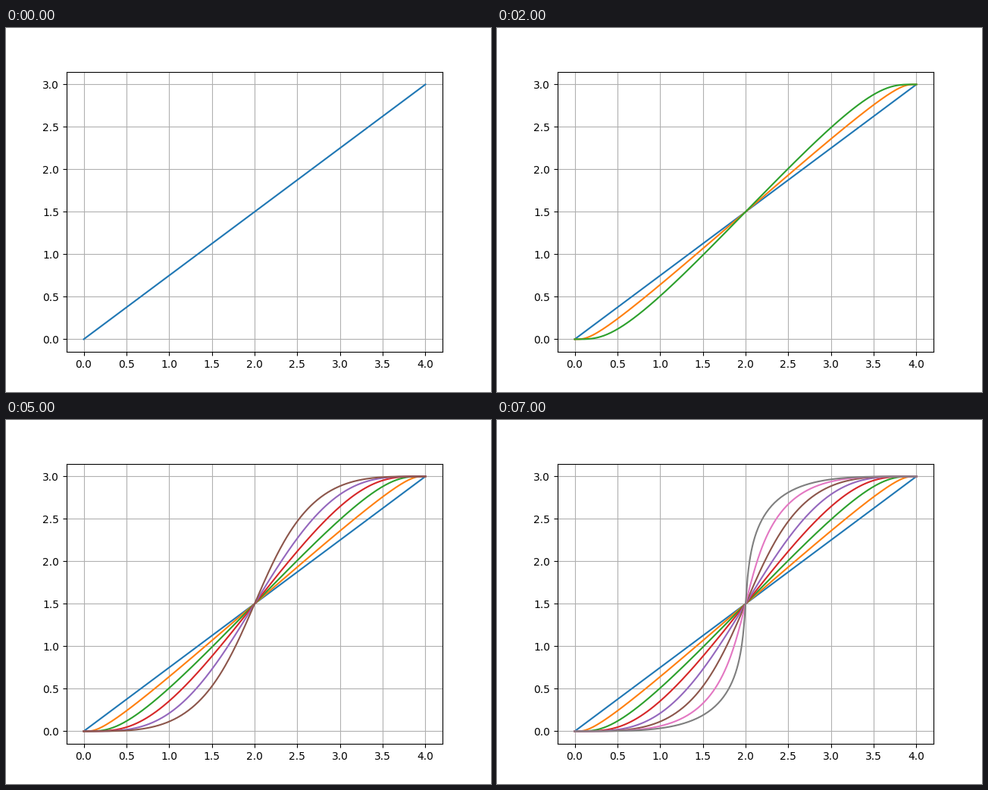
A matplotlib script that plays this animation: 640 px wide and 480 px high, repeating every 8 s.

```python
import numpy as np
import matplotlib.pyplot as plt
from matplotlib.animation import FuncAnimation

END_X, END_Y = 4, 3
CURVES = 8


def smooth(t):
    """Septic step with zero velocity, acceleration and jerk at both ends."""
    return t**4 * (35 - 84 * t + 70 * t**2 - 20 * t**3)


fig, ax = plt.subplots(figsize=(6.4, 4.8), dpi=100)
ax.grid(True)

# Each curve leaves and arrives horizontally with speed v.
t = np.linspace(0, 1, 200)
s = smooth(t)
lines = [ax.plot(END_X * s + v * (t - s), END_Y * s, color=f"C{v}")[0]
         for v in range(CURVES)]
ax.set_xlim(-0.05 * END_X, 1.05 * END_X)
ax.set_ylim(-0.05 * END_Y, 1.05 * END_Y)


def update(frame):
    for v, line in enumerate(lines):
        line.set_visible(v <= frame)
    return lines


anim = FuncAnimation(fig, update, frames=CURVES, interval=1000,
                     repeat=True, repeat_delay=0)
plt.show()
```
